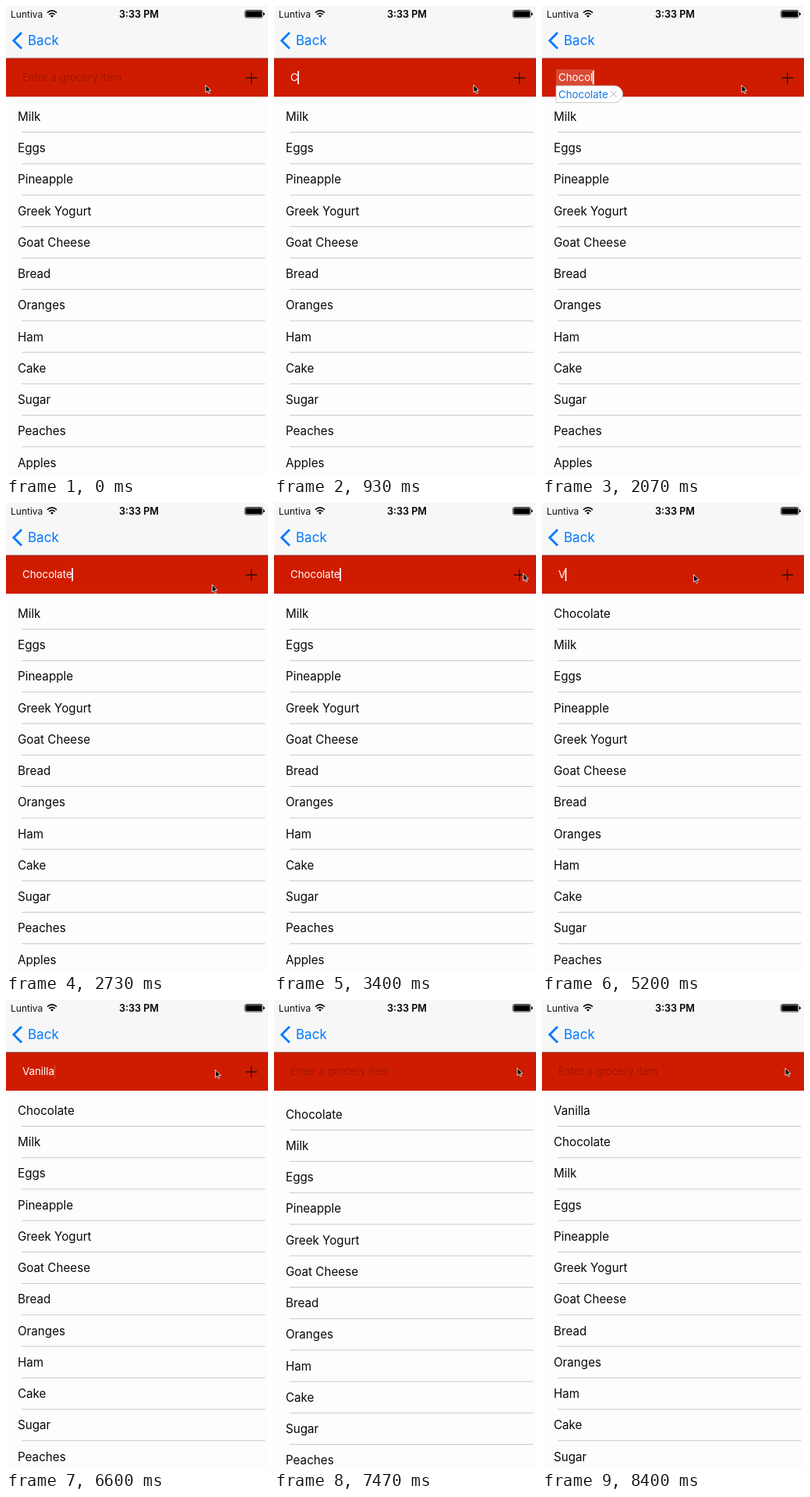
Write an HTML page that moves like this. It is 336x600 px and loops after 8.47 s.

```html
<!DOCTYPE html>
<html lang="en">
<head>
<meta charset="utf-8">
<title>Grocery list</title>
<style>
  html, body { margin: 0; width: 100%; height: 100%; overflow: hidden; background: #fefdfe; }
  svg { display: block; width: 336px; height: 600px; }
  text { font-family: Inter, Roboto, sans-serif; white-space: pre; }
  .row text { font-size: 15.2px; fill: #080808; }
  .row path { stroke: #c8c7cc; }
  .field { font-size: 13.3px; }
</style>
</head>
<body>
<svg viewBox="0 0 336 600">
  <rect width="336" height="600" fill="#fefdfe"/>
  <g id="list"></g>

  <rect width="336" height="67" fill="#f7f7f8"/>
  <rect y="67" width="336" height="49" fill="#cf1c00"/>
  <rect y="66.5" width="336" height="1" fill="#8f3a30"/>

  <text x="6" y="14.5" font-size="12" fill="#111">Luntiva</text>
  <g fill="none" stroke="#000" stroke-width="1.6">
    <path d="M53 8.6Q59 3.2 65 8.6M55.2 11Q59 7.6 62.8 11"/>
    <path d="M57 12.6Q59 11 61 12.6L59 14.8Z" fill="#000" stroke="none"/>
  </g>
  <text x="170.5" y="14.5" font-size="12.6" font-weight="600" text-anchor="middle">3:33 PM</text>
  <rect x="306.5" y="5.5" width="22.5" height="9.5" rx="2" fill="none" stroke="#000" stroke-width=".8"/>
  <rect x="307.5" y="6.5" width="20.5" height="7.5" rx="1"/>
  <path d="M330 8.3Q331.8 8.6 331.8 10.2T330 12.2Z"/>

  <path d="M20 34L9.8 44.2L20 54.4" fill="none" stroke="#007aff" stroke-width="2.8"/>
  <text x="28" y="50.2" font-size="17" fill="#007aff">Back</text>

  <path id="plus" d="M307.5 92H322M314.7 84.8V99.2" stroke="#30100a" stroke-width="1.3"/>
  <text id="hint" class="field" x="21" y="96.3" fill="#a41500">Enter a grocery item</text>
  <rect id="mark" x="18" y="81" height="21" fill="#fff" opacity=".2"/>
  <text id="typed" class="field" x="21" y="96.3" fill="#fff"></text>
  <rect id="caret" y="83" width="1.7" height="17" fill="#fff"/>
  <g id="pill">
    <path id="shape" fill="#fff" stroke="#c3bcbc" stroke-width=".8"/>
    <text id="guess" class="field" x="21" y="117.5" fill="#1878e0"></text>
    <path id="cross" d="M-4 -4L4 4M4 -4L-4 4" stroke="#b4b4b8"/>
  </g>
  <path id="mouse" d="M0 0V9.6L2.2 7.6L3.7 11L5.3 10.3L3.8 7H6.8Z" fill="#000" stroke="#fff" stroke-width=".8"/>
</svg>
<script>
const LOOP = 8470, STEP = 40.23;
const $ = id => document.getElementById(id);
const clamp = v => Math.max(0, Math.min(1, v));
const ramp = (t, from, to) => clamp((t - from) / (to - from));
const smooth = v => v * v * (3 - 2 * v);

const items = ['Vanilla', 'Chocolate', 'Milk', 'Eggs', 'Pineapple', 'Greek Yogurt', 'Goat Cheese',
  'Bread', 'Oranges', 'Ham', 'Cake', 'Sugar', 'Peaches', 'Apples'];
$('list').innerHTML = items.map(name =>
  `<g class="row"><text x="15" y="147">${name}</text><path d="M20 161.5H332.5"/></g>`).join('');
const rows = [...$('list').children];

// time, text in the field, suggestion, focus
const edits = [
  [0, '', '', false], [70, '', '', true], [930, 'C', '', true],
  [1270, 'Ch', '', true], [1330, 'Cho', '', true],
  [1470, 'Choc', 'Chi', true], [1530, 'Choco', 'Chi', true],
  [1800, 'Chocol', 'Chocolate', true], [2200, 'Chocola', 'Chocolate', true],
  [2270, 'Chocolat', 'Chocolate', true], [2400, 'Chocolate', '', true],
  [3470, '', '', false], [4470, '', '', true], [5130, 'V', '', true],
  [5600, 'Va', '', true], [5670, 'Van', '', true], [5800, 'Vani', '', true],
  [5870, 'Vanil', '', true], [5940, 'Vanill', '', true], [6040, 'Vanilla', '', true],
  [7400, '', '', false]
];

// time, x, y
const path = [
  [0, 256, 101], [2600, 256, 101], [2900, 275, 109], [3330, 319.5, 90], [3700, 319.5, 90],
  [4070, 194.5, 91.5], [6270, 194.5, 91.5], [6600, 268.5, 89.5], [7070, 299, 88],
  [7330, 312, 87], [LOOP, 312, 87]
];

function pointer(t) {
  const i = path.findIndex(p => p[0] > t);
  const a = path[i - 1], b = path[i], k = ramp(t, a[0], b[0]);
  return [a[1] + (b[1] - a[1]) * k, a[2] + (b[2] - a[2]) * k];
}

function blink(age) {
  const p = age % 1000;
  return 1 - ramp(p, 420, 590) + ramp(p, 840, 1000);
}

function draw(t) {
  const first = smooth(ramp(t, 3470, 3800)), second = smooth(ramp(t, 7400, 7730));
  rows.forEach((row, i) => {
    row.setAttribute('transform', `translate(0 ${STEP * (i - 2 + first + second)})`);
    row.setAttribute('opacity', i === 0 ? second : i === 1 ? first : 1);
  });

  const [since, text, guess, focus] = edits.filter(e => e[0] <= t).pop();
  $('typed').textContent = text;
  $('hint').setAttribute('visibility', text ? 'hidden' : 'visible');
  const end = 21 + (text ? $('typed').getComputedTextLength() : 0);
  $('caret').setAttribute('x', end - .5);
  $('caret').setAttribute('opacity', focus ? blink(t - since) : 0);

  $('mark').setAttribute('width', guess ? end - 16 : 0);
  $('pill').setAttribute('visibility', guess ? 'visible' : 'hidden');
  $('guess').textContent = guess;
  if (guess) {
    const right = 21 + $('guess').getComputedTextLength() + 19;
    $('shape').setAttribute('d', `M18 102H${right - 11}a10.8 10.8 0 0 1 0 21.6H18Z`);
    $('cross').setAttribute('transform', `translate(${right - 12} 112.8)`);
  }

  const press = ramp(t, 3470, 3540) - ramp(t, 3650, 3850) + ramp(t, 7330, 7400);
  $('plus').setAttribute('opacity', 1 - .8 * press);
  $('mouse').setAttribute('transform', `translate(${pointer(t)})`);
}

const start = performance.now();
function tick() {
  draw((performance.now() - start) % LOOP);
  requestAnimationFrame(tick);
}
tick();
</script>
</body>
</html>
```
